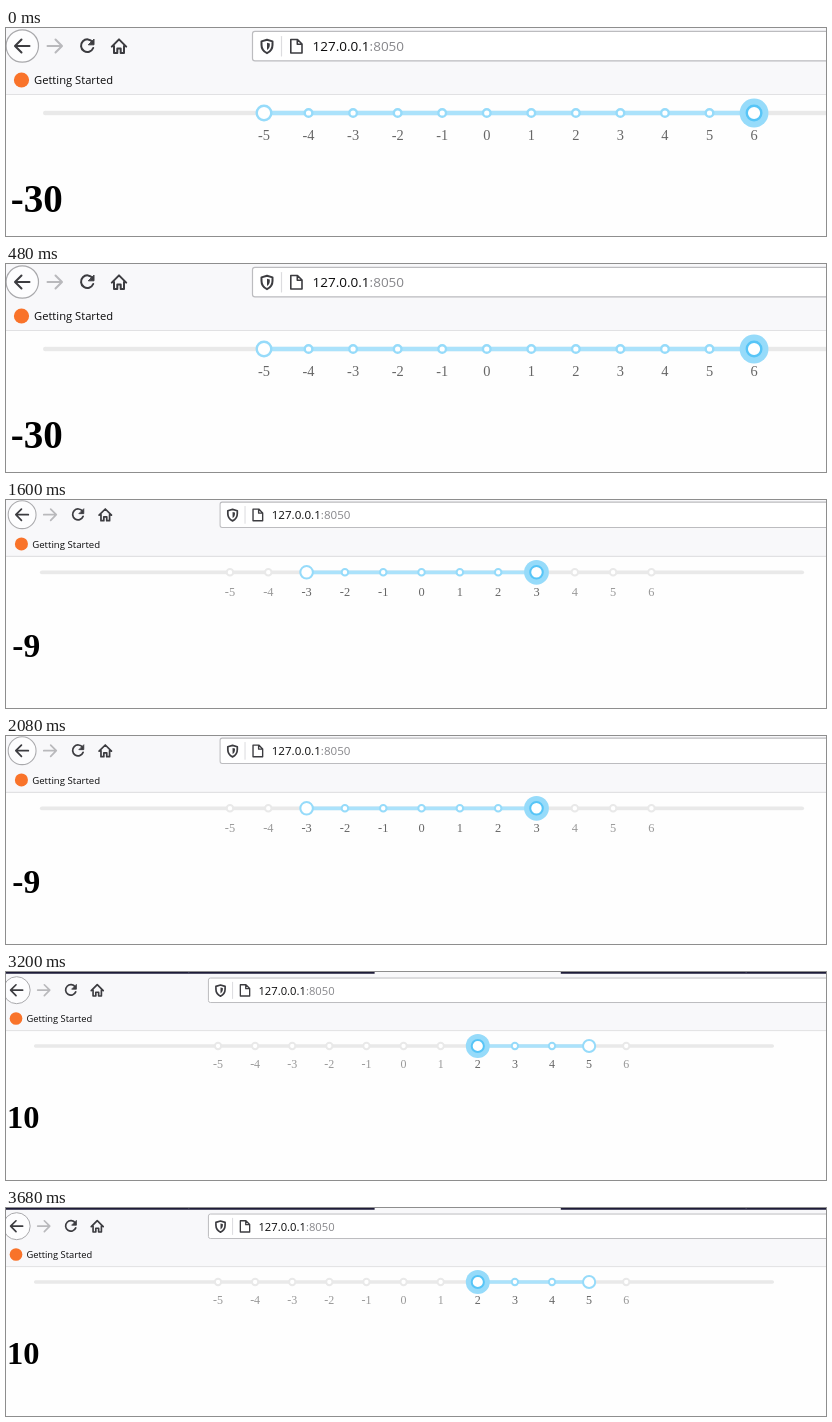
Recreate the animation shown at these times as an HTML page. Size 820 px wide and 208 px high, loop 4 s.

```html
<!DOCTYPE html>
<html lang="en">
<head>
<meta charset="utf-8">
<title>Range slider</title>
<style>
  html, body { margin: 0; width: 100%; height: 100%; overflow: hidden; background: #fefefe; }
  svg { display: block; width: 820px; height: 208px; }
  .view { visibility: hidden; animation: show 4s step-end infinite; }
  @keyframes show {
    0% { visibility: visible; }
    20%, 100% { visibility: hidden; }
  }
  .ui { font-family: "Open Sans", "Noto Sans", sans-serif; fill: #0c0c0d; }
  .url { font-size: 13.5px; }
  .port { fill: #87878b; }
  .bookmark { font-size: 11.2px; }
  .icon { fill: none; stroke: #3c3c40; stroke-width: 2; stroke-linejoin: round; stroke-linecap: round; }
  .mark { font: 14.4px "Liberation Serif", "Times New Roman", serif; text-anchor: middle; fill: #999; }
  .mark.on { fill: #666; }
  .sum { font: bold 39px "Liberation Serif", "Times New Roman", serif; }
  .dot { fill: #fff; stroke: #e9e9e9; stroke-width: 2.4; }
  .dot.on, .handle { stroke: #96dbfa; }
  .handle { fill: #fff; stroke-width: 2.4; }
  .handle.drag { stroke: #57c5f7; }
</style>
</head>
<body>
<svg id="stage" viewBox="0 0 820 208">
  <defs>
    <g id="browser">
      <rect x="-5.1" y="-10" width="1010" height="76" fill="#f8f8fa"/>
      <path d="M-5.1 66.5H1005" stroke="#e1e1e3" stroke-width="1.2"/>
      <path d="M-9 -10H446V-1.6H-9ZM669.5 -10H1005V-1.6H669.5Z" fill="#1d1b38"/>
      <path d="M223 -10V-1.6M892 -10V-1.6" stroke="#55546c"/>
      <rect x="-9" y="83" width="3.9" height="200" fill="#cacaca"/>

      <circle cx="16.3" cy="18" r="16.2" fill="#fdfdfe" stroke="#a9a9ac" stroke-width="1.2"/>
      <g class="icon">
        <path id="arrow" d="M23.5 18H9.5M15.5 11.5L9 18L15.5 24.5"/>
        <path d="M41.5 18H55.5M49.5 11.5L56 18L49.5 24.5" stroke="#b9b9bc"/>
        <path d="M86.6 14.2A6.3 6.3 0 1 0 87.2 20"/>
        <path d="M88 11.5V16.8H82.7Z" fill="#3c3c40" stroke-width="1"/>
        <path d="M105.8 18.6L113 11.4L120.2 18.6M108 18V25H111.3V20.5H114.7V25H118V18"/>
      </g>

      <rect x="246.5" y="3.4" width="760" height="29.4" rx="2.4" fill="#fff" stroke="#bcbcbf" stroke-width="1.2"/>
      <g class="icon" stroke-width="1.7">
        <path d="M261 11.8L266.5 13.4V17C266.5 21 264.4 23.6 261 25.2C257.6 23.6 255.5 21 255.5 17V13.4Z"/>
        <path d="M261 14.8V22C263 20.7 263.8 19 263.8 17V15.5Z" fill="#3c3c40" stroke="none"/>
        <path d="M275.5 8.5V28" stroke="#dcdcdf" stroke-width="1.2"/>
        <path d="M284.8 11.5H291.5L296 16V25H284.8ZM291.3 11.8V16.2H295.8" stroke-width="1.6"/>
      </g>
      <text class="ui url" x="306.5" y="23.2">127.0.0.1<tspan class="port">:8050</tspan></text>

      <circle cx="15.5" cy="52" r="7.6" fill="#f9732a"/>
      <text class="ui bookmark" x="28" y="56.4">Getting Started</text>
    </g>
  </defs>
</svg>
<script>
const HOLD = 0.8;
const RAIL_Y = 85;
const markX = v => 258 + (v + 5) * 44.55;

// lo..hi is the selected range, drag the value being moved
const views = [
  { x: 0,    y: 0,    scale: 1,     lo: -5, hi: 6,  drag: 6,  sum: -30 },
  { x: 2.4,  y: 2.7,  scale: 0.851, lo: -3, hi: 6,  drag: -3, sum: -18 },
  { x: 2.1,  y: -0.8, scale: 0.86,  lo: -3, hi: 3,  drag: 3,  sum: -9 },
  { x: 6.9,  y: -3.2, scale: 0.855, lo: -5, hi: -1, drag: -5, sum: 5 },
  { x: -2.9, y: 3.2,  scale: 0.833, lo: 2,  hi: 5,  drag: 2,  sum: 10 }
];

const bar = (x1, x2, color) =>
  `<rect x="${x1}" y="${RAIL_Y - 2.2}" width="${x2 - x1}" height="4.4" rx="2.2" fill="${color}"/>`;

const circle = (v, r, attrs) =>
  `<circle cx="${markX(v)}" cy="${RAIL_Y}" r="${r}" ${attrs}/>`;

function slider({ lo, hi, drag }) {
  let out = bar(37, 925.5, '#e9e9e9') + bar(markX(lo), markX(hi), '#abe2fb');
  for (let v = -5; v <= 6; v++) {
    const on = v >= lo && v <= hi ? ' on' : '';
    out += circle(v, 3.8, `class="dot${on}"`);
    out += `<text class="mark${on}" x="${markX(v)}" y="112">${v}</text>`;
  }
  for (const v of [lo, hi]) {
    if (v === drag) out += circle(v, 14.4, 'fill="#96dbfa"');
    out += circle(v, 7.3, `class="handle${v === drag ? ' drag' : ''}"`);
  }
  return out;
}

const scene = (view, i) => `
  <g class="view" style="animation-delay:${(i - views.length) * HOLD}s"
     transform="translate(${view.x} ${view.y}) scale(${view.scale})">
    <use href="#browser"/>
    ${slider(view)}
    <text class="sum" x="4.8" y="184">${view.sum}</text>
  </g>`;

document.getElementById('stage').insertAdjacentHTML('beforeend', views.map(scene).join(''));
</script>
</body>
</html>
```
